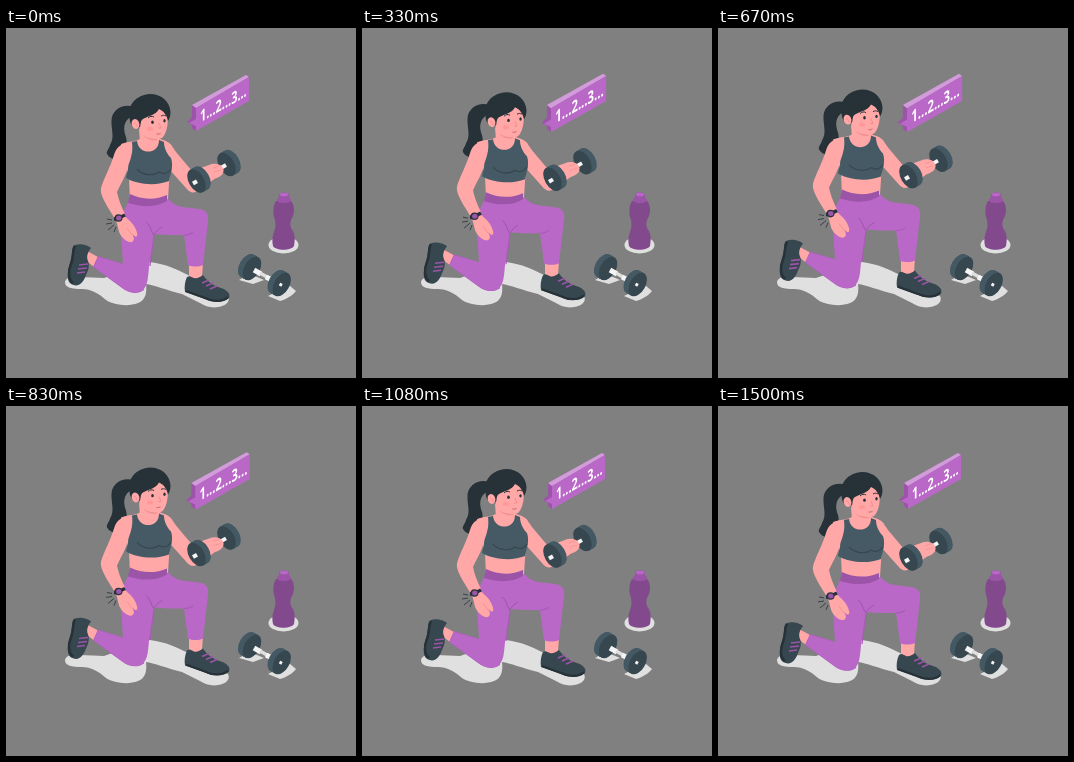
These frames come from a looping animation (350x350 px, 1.54 s). An HTML page with a canvas:

```html
<!DOCTYPE html>
<html>
<head>
<meta charset="utf-8">
<style>
html, body { margin: 0; width: 100%; height: 100%; overflow: hidden; background: #808080; }
canvas { display: block; width: 350px; height: 350px; }
</style>
</head>
<body>
<canvas id="stage" width="350" height="350"></canvas>
<script>
const ctx = document.getElementById('stage').getContext('2d');
const LOOP = 1540, STEPS = 37;
const SKIN = '#ffa8a7', SKIN_DARK = '#f28f8f', PURPLE = '#ba68c8', PLUM = '#9b54a8', DEEP = '#82498c';
const SLATE = '#455a64', DARK = '#37474f', INK = '#263238', PALE = '#e0e0e0';

function fill(color, d) {
  ctx.fillStyle = color;
  ctx.fill(new Path2D(d));
}

function line(color, width, d) {
  ctx.strokeStyle = color;
  ctx.lineWidth = width;
  ctx.stroke(new Path2D(d));
}

function oval(color, x, y, rx, ry, angle = 0) {
  ctx.fillStyle = color;
  ctx.beginPath();
  ctx.ellipse(x, y, rx, ry, angle, 0, 7);
  ctx.fill();
}

// Thick isometric disc: its face is at (x, y), its back lies at (dx, dy) from it.
function weight(x, y, dx, dy) {
  const angle = Math.atan2(dy, dx);
  for (let i = 10; i >= 0; i--) {
    oval(i ? SLATE : DARK, x + dx * i / 10, y + dy * i / 10, 7.7, 12.8, angle);
  }
}

function drawShadow() {
  fill(PALE, 'M59 254C60 249 66 248 74 249L98 250 144 234C160 236 172 242 180 246L222 268C224 272 222 276 216 278C208 281 200 279 194 275L176 266C160 262 148 257 140 256C141 264 140 272 132 275C122 279 108 277 100 272C92 265 85 261 76 261C66 261 59 260 59 254Z');
}

function drawBottle() {
  oval(PALE, 277.5, 217, 15, 8.5);
  fill(DEEP, 'M270 173C267 177 267 185 268 189C270 194 270 199 268 204C266 209 266 214 267 218C270 223 285 223 288 218C289 212 289 207 287 203C283 198 284 193 287 188C289 182 288 176 285 173Z');
  fill(PLUM, 'M271 173C271 170 272 170 273 169L273 166C275 164 281 164 283 166L283 169C284 170 285 171 285 173C281 176 274 176 271 173Z');
  oval(PURPLE, 278, 166.5, 4.2, 1.8);
}

function drawFloorDumbbell() {
  fill(PALE, 'M233 252L244 246 258 252 247 256ZM262 268L272 263 284 258 290 263C287 267 281 271 274 273Z');
  weight(246, 240.5, -4.8, -2.8);
  line('#f5f5f5', 5, 'M248 242L255 246');
  line('#e0e0e0', 3.5, 'M254 245L268 253');
  line('#f5f5f5', 5, 'M260 249L266 252');
  weight(275.7, 256.5, -5, -2.8);
  line('#f5f5f5', 3, 'M273.5 256L276 257.4');
}

function drawBubble(scale) {
  ctx.save();
  ctx.translate(214, 76);
  ctx.scale(scale, scale);
  ctx.translate(-214, -76);
  fill(PLUM, 'M186 77L190 80 190 103 186 100 186 97 181 94 186 89Z');
  fill('#d39bdc', 'M186 77L240 47 243 49 190 80Z');
  fill(PURPLE, 'M190 80L243 49 243 73 190 103 190 98 183 95 190 91Z');
  ctx.transform(0.84, -0.48, 0, 1.25, 194, 94.5);
  ctx.fillStyle = '#fff';
  ctx.font = 'bold 13px "Open Sans", sans-serif';
  ctx.fillText('1...2...3...', 0, 0);
  ctx.restore();
}

function drawLegs() {
  // rear foot
  fill(SKIN, 'M79 222L92 229 88 239 79 232Z');
  fill(DARK, 'M69 217C74 215 82 217 85 220C82 224 80 228 82 233C84 238 82 243 80 247C78 253 75 257 70 257.5C63 257 61 252 62 245C63 236 66 230 66 224C66 220 67 218 69 217Z');
  line(INK, 2.5, 'M69 218C66 223 68 229 65 236C62 243 62 251 67 255');
  line(PLUM, 1.6, 'M73 237L82 236M72 241L81 240M71 245L79 244');
  // rear leg
  fill('#ad5fbb', 'M92 228L118 236 134 244 138 262C131 267 122 265 116 260L87 239Z');
  fill(PURPLE, 'M124 172C117 181 115 193 115 205L117 236L92 229 88 239 117 260C122 264 130 267 137 262C142 257 142 249 143 239L148 207 160 180Z');
  // front foot
  fill(SKIN, 'M183 234L197 234 196 249C193 254 185 253 183 248Z');
  fill(DARK, 'M181 249C184 247 185 249 188 250C191 251 194 249 197 247C201 253 207 258 215 260C221 262 225 266 223 270C218 275 207 275 199 271L179 264C178 259 179 253 181 249Z');
  line(INK, 2.2, 'M180 263L199 270C207 274 217 274 222 269');
  line(PLUM, 1.6, 'M196 255L203 252M200 258L207 255M204 261L211 258');
  // front leg
  fill(PURPLE, 'M124 170L160 167C163 173 168 177 176 179L193 181C200 182 203 186 202 193L197 237C193 239 186 239 182 237L178 207C168 207 158 207 147 206C134 203 125 192 124 170Z');
  line(PLUM, 1, 'M148 207C145 204 145 198 140 194M148 206C150 204 152 201 156 199');
  line('#a95bb7', 1.2, 'M148 207L144 238M178 207C181 207 185 206 187 204');
}

function drawTorso() {
  fill(SKIN, 'M115 116C124 113 131 114 135 110L151 108C154 113 162 112 166 118L164 140 162 171C150 177 133 177 124 172L123 150Z');
  fill(PLUM, 'M124 166C136 172 150 172 161 167L161 173C150 180 135 179 122 175Z');
  fill(SLATE, 'M126 114L131 113C132 122 140 125 146 123C151 121 153 117 153 112L158 114C158 120 161 126 165 130C168 139 164 147 163 153C151 158 132 157 120 150C121 145 123 140 122 134C126 127 126 121 126 114Z');
  line(DARK, 1.2, 'M131 141C137 148 148 148 153 144C158 147 162 145 165 141');
}

function drawNearArm() {
  fill(SKIN, 'M126 114C117 114 110 119 108 127C104 140 98 150 95 160C94 166 98 172 101 178L109 191 119 186C115 178 112 170 111 164C115 155 121 146 122 138C126 128 127 122 126 114Z');
  fill(SKIN, 'M109 190L118 187C121 191 126 194 128 198C130 201 132 206 131 208C129 210 127 206 126 206C128 209 129 212 126 214C122 215 117 211 114 206C112 202 112 197 109 190Z');
  line(SKIN_DARK, 0.8, 'M121 200L126 207');
  line(INK, 3.5, 'M108 191C111 191 115 189 119 187');
  oval(INK, 112.5, 190, 4, 3.8);
  oval(PLUM, 112.8, 190, 2.7, 2.5);
  line(INK, 0.8, 'M106 192L101 191M106 195L100 196M108 197L102 202M110 199L108 204');
}

function drawFarArm() {
  fill(SKIN, 'M156 112C163 113 166 118 170 124L186 143 206 136 214 147 193 162C188 166 184 165 180 160L163 141Z');
}

function drawHeldDumbbell() {
  weight(220.5, 136.5, 5, -2.9);
  line('#f5f5f5', 3.8, 'M194 152L220 137');
  fill(SKIN, 'M200 141C202 137 207 135 211 136C216 137 219 141 217 145C215 149 208 152 204 150C201 148 199 145 200 141Z');
  line(SKIN_DARK, 0.7, 'M207 140L213 138M208 144L215 142');
  weight(190.5, 153, 5, -2.9);
  line('#f5f5f5', 4, 'M187 155.5L191 153.2');
}

function drawHead() {
  fill(SKIN, 'M133 101L151 106 151 115C148 121 138 121 134 114Z');
  fill(SKIN_DARK, 'M137 107C141 110 146 111 151 111L151 112C145 113 140 111 137 107Z');
  fill(SKIN, 'M131 86C138 75 156 74 161 84C163 94 161 104 157 109C153 113 144 110 139 107C134 105 131 95 131 86Z');
  fill(INK, 'M123.5 90C121 77 130 67 144 66C156 66 164 74 164.5 84C164.5 88 163.5 91 162 93C161 88 158 83 153 81C150 87 142 88 137 91C134 93 135 97 134 99C128 102 124 97 123.5 90Z');
  oval(SKIN, 129.5, 96, 3.8, 5, -0.3);
  line(SKIN_DARK, 0.8, 'M128 95C130 95 131 97 131 99');
  oval(INK, 146.5, 94.2, 1.3, 1.7);
  oval(INK, 158.5, 92.8, 1.2, 1.7);
  line(INK, 1, 'M142 90C144 88 146 88 148 89M155 88C157 87 158 87 160 88');
  line(SKIN_DARK, 1, 'M153 95L155 100 152 100');
  line('#c95e68', 1, 'M150.5 106C152 106.3 153 106 154.5 105.3');
  oval('#ff9896', 144, 101, 3, 2);
}

function drawPonytail() {
  fill(INK, 'M128 79C117 75 106 82 105.5 92C105 102 109 109 104 117C103 121 100 123 101 126C104 131 109 132 113 130C120 126 122 116 120 109C117 101 117 93 126 88Z');
}

function drawWoman(lift) {
  ctx.save();
  ctx.translate(0, -lift);
  drawPonytail();
  drawFarArm();
  drawLegs();
  drawTorso();
  drawNearArm();
  drawHeldDumbbell();
  drawHead();
  ctx.restore();
}

function render(now) {
  const step = Math.floor((now % LOOP + 5) / LOOP * STEPS) % STEPS;
  const time = step * LOOP / STEPS;
  const lift = 4.6 * (1 - Math.cos(2 * Math.PI * time / LOOP)) / 2;
  const pulse = time < 960 ? Math.sin(Math.PI * time / 480) ** 2 : 0;

  ctx.fillStyle = '#808080';
  ctx.fillRect(0, 0, 350, 350);
  drawShadow();
  drawBottle();
  drawFloorDumbbell();
  drawWoman(lift);
  drawBubble(1 + pulse * (time < 480 ? 0.06 : 0.045));
}

const start = performance.now();
function tick() {
  render(performance.now() - start);
  requestAnimationFrame(tick);
}
tick();
</script>
</body>
</html>
```
